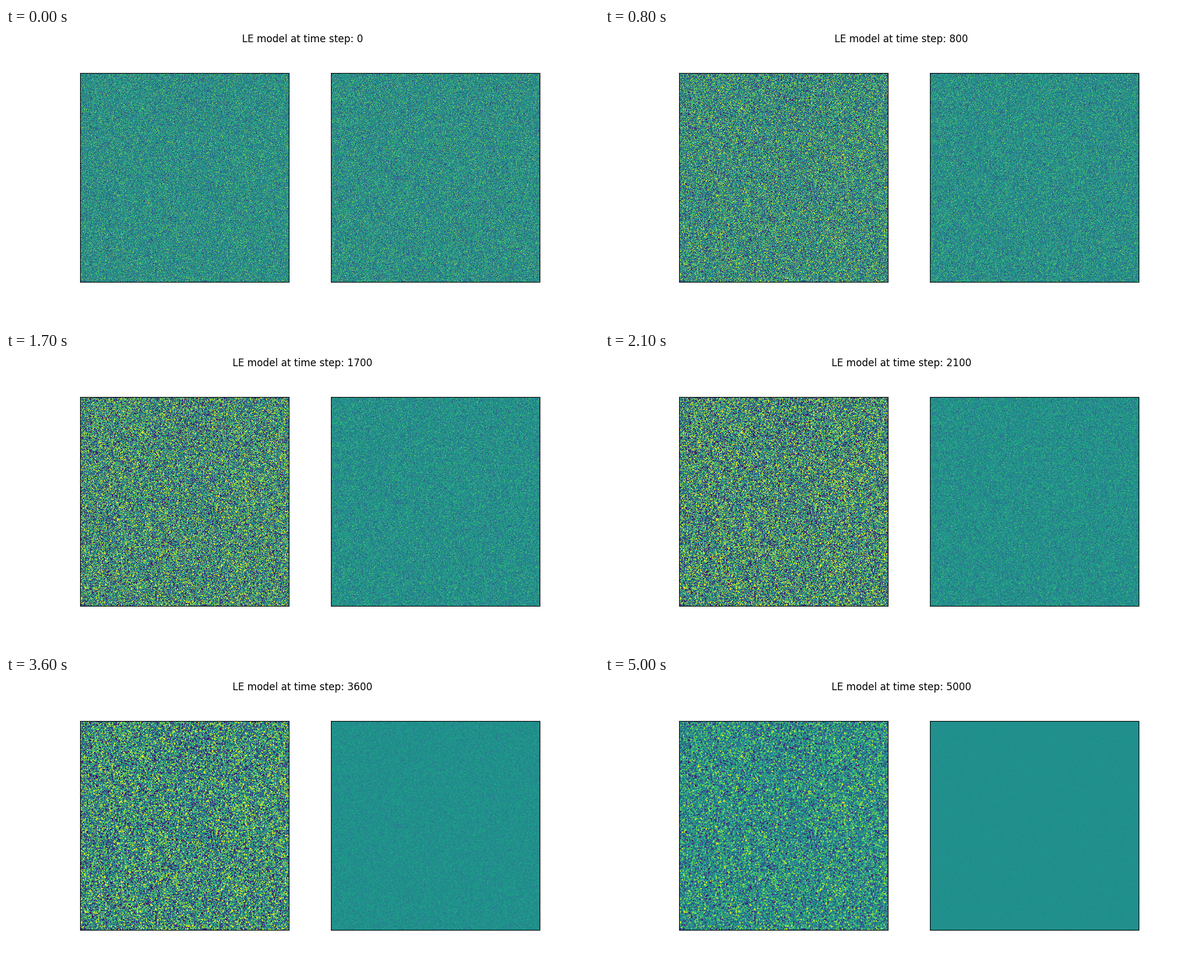
These frames come from a looping animation (1000 by 500 pixels, 5100 ms). A matplotlib script:

```python
import numpy as np
import matplotlib.pyplot as plt
from matplotlib.animation import FuncAnimation

plt.rcParams["font.family"] = "DejaVu Sans"

N = 400
FRAMES = 51
STEPS_PER_FRAME = 100

# Spread of each species around its mean, as a share of the colour range.
KEY_STEPS = [0, 400, 900, 1300, 2100, 3600, 4300, 5000]
SPREAD_U = [0.16, 0.20, 0.265, 0.30, 0.32, 0.285, 0.25, 0.20]
SPREAD_V = [0.16, 0.15, 0.135, 0.12, 0.092, 0.046, 0.025, 0.010]

rng = np.random.default_rng(7)
spectrum_u = np.fft.rfft2(rng.standard_normal((N, N)))
spectrum_v = np.fft.rfft2(rng.standard_normal((N, N)))
kx = 2 * np.pi * np.fft.rfftfreq(N)
ky = 2 * np.pi * np.fft.fftfreq(N)
k_squared = ky[:, None] ** 2 + kx[None, :] ** 2


def field(spectrum, step, spread, diffusion):
    """Diffused noise with the spread it has reached at this step."""
    smooth = np.exp(-diffusion * k_squared * step / 5000)
    noise = np.fft.irfft2(spectrum * smooth, s=(N, N))
    return 0.5 + np.interp(step, KEY_STEPS, spread) * noise / noise.std()


def concentrations(step):
    return (field(spectrum_u, step, SPREAD_U, 0.2),
            field(spectrum_v, step, SPREAD_V, 0.1))


fig, axes = plt.subplots(1, 2, figsize=(10, 5), dpi=100)
title = fig.suptitle("LE model at time step: 0", fontsize=12)
images = []
for ax, values in zip(axes, concentrations(0)):
    images.append(ax.imshow(values, cmap="viridis", vmin=0, vmax=1,
                            interpolation="nearest"))
    ax.set_xticks([])
    ax.set_yticks([])


def update(frame):
    step = frame * STEPS_PER_FRAME
    for image, values in zip(images, concentrations(step)):
        image.set_data(values)
    title.set_text(f"LE model at time step: {step}")
    return [*images, title]


animation = FuncAnimation(fig, update, frames=FRAMES, interval=100,
                          repeat=True, repeat_delay=0, blit=False)
plt.show()
```
